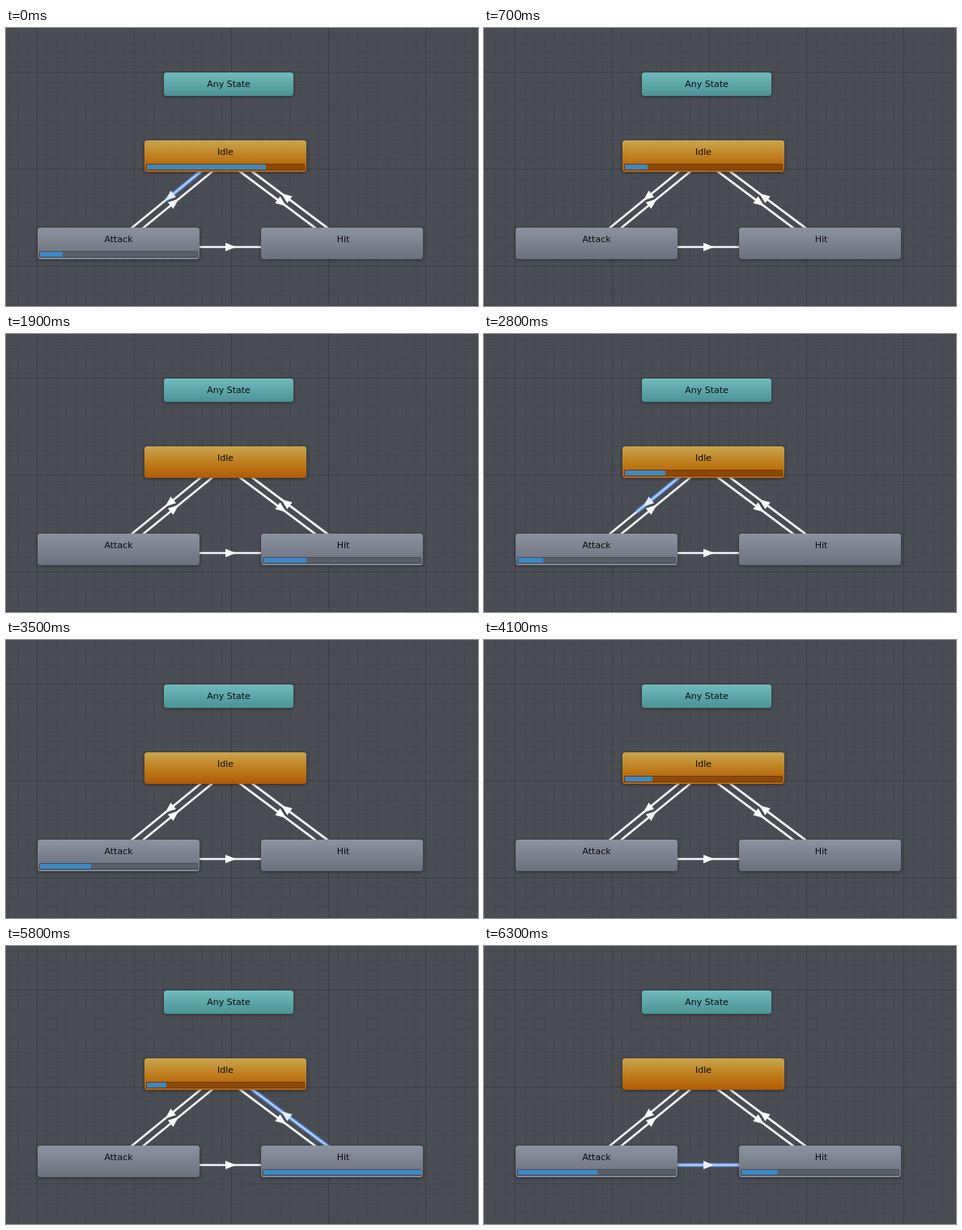
These frames come from a looping animation (583x344 px, 6.4 s). An HTML page with a canvas:

```html
<!DOCTYPE html>
<html lang="en">
<head>
<meta charset="utf-8">
<title>State machine</title>
<style>
html, body { margin: 0; width: 100%; height: 100%; overflow: hidden; background: #4a4d54; }
canvas { display: block; }
</style>
</head>
<body>
<canvas id="stage" width="583" height="344"></canvas>
<script>
const ctx = document.getElementById("stage").getContext("2d");
const LOOP = 6400, STEP = 100;

const GREY = { fill: ["#8d92a1", "#6b707c"], trough: "#595e69", edge: "#484c56", rim: "#969baa" };
const nodes = {
  any: { label: "Any State", x: 195, y: 55, w: 160, h: 29, fill: ["#70bbbc", "#4c9295"] },
  idle: { label: "Idle", x: 171, y: 139, w: 200, h: 39, fill: ["#c9a64f", "#bf7f1e", "#b05a04"],
          trough: "#8a4a06", edge: "#723b04", rim: "#c46f12" },
  attack: { label: "Attack", x: 39, y: 247, w: 200, h: 39, ...GREY },
  hit: { label: "Hit", x: 315, y: 247, w: 200, h: 39, ...GREY }
};

const links = [["idle", "attack"], ["attack", "idle"], ["idle", "hit"], ["hit", "idle"], ["attack", "hit"]];

// Playback of a state: name, start, end, clip length (ms)
const plays = [
  ["idle", -1361, 91, 1805], ["attack", -106, 600, 740],
  ["idle", 442, 895, 1800], ["hit", 708, 1645, 937],
  ["idle", 1420, 1830, 1800], ["hit", 1645, 2575, 930],
  ["idle", 2335, 2862, 1800], ["attack", 2705, 3305, 600],
  ["idle", 3155, 3460, 1800], ["attack", 3305, 3910, 600],
  ["idle", 3785, 5065, 1800], ["hit", 4882, 5812, 915],
  ["idle", 5575, 6090, 1800], ["attack", 5928, 6400, 740],
  ["hit", 6093, 6400, 915]
];

// Transition pulse: from, to, start, end
const pulses = [
  ["idle", "attack", -106, 91], ["attack", "idle", 442, 600],
  ["idle", "hit", 708, 895], ["hit", "idle", 1420, 1645],
  ["idle", "hit", 1645, 1830], ["hit", "idle", 2335, 2575],
  ["idle", "attack", 2705, 2862], ["attack", "idle", 3155, 3305],
  ["idle", "attack", 3305, 3460], ["attack", "idle", 3785, 3910],
  ["idle", "hit", 4882, 5065], ["hit", "idle", 5575, 5812],
  ["idle", "attack", 5928, 6090], ["attack", "hit", 6093, 6350]
];

function drawGrid() {
  ctx.fillStyle = "#4a4d54";
  ctx.fillRect(0, 0, 583, 344);
  const lines = (step, x0, y0, color) => {
    ctx.fillStyle = color;
    for (let x = x0; x < 583; x += step) ctx.fillRect(x, 0, 1, 344);
    for (let y = y0; y < 344; y += step) ctx.fillRect(0, y, 583, 1);
  };
  lines(12, 2, 6, "#45484f");
  lines(120, 38, 54, "#3b3e44");
}

function line(length, width, color) {
  ctx.strokeStyle = color;
  ctx.lineWidth = width;
  ctx.beginPath();
  ctx.moveTo(0, 0);
  ctx.lineTo(length, 0);
  ctx.stroke();
}

function drawLink([from, to], t) {
  const a = nodes[from], b = nodes[to];
  const dx = b.x - a.x, dy = b.y - a.y, length = Math.hypot(dx, dy);
  const pulse = pulses.find(p => p[0] === from && p[1] === to && t >= p[2] && t < p[3]);
  ctx.save();
  ctx.translate(a.x + a.w / 2, a.y + a.h / 2);
  ctx.rotate(Math.atan2(dy, dx));
  ctx.translate(0, 4.5);
  line(length, 2.6, "#f4f5f5");
  if (pulse) {
    const reach = length * (t - pulse[2]) / (pulse[3] - pulse[2]);
    line(reach, 6, "rgba(86,140,225,.45)");
    line(reach, 3.6, "#78a8ee");
    line(reach, 1.4, "#bcd6ff");
  }
  ctx.fillStyle = pulse ? "#e2edff" : "#fff";
  ctx.beginPath();
  ctx.moveTo(length / 2 + 7, 0);
  ctx.lineTo(length / 2 - 6, -5.2);
  ctx.lineTo(length / 2 - 6, 5.2);
  ctx.fill();
  ctx.restore();
}

function drawNode(name, t) {
  const { label, x, y, w, h, fill, trough, edge, rim } = nodes[name];
  const gradient = ctx.createLinearGradient(0, y, 0, y + h);
  fill.forEach((color, i) => gradient.addColorStop(i / (fill.length - 1), color));
  ctx.save();
  ctx.shadowColor = "rgba(0,0,0,.45)";
  ctx.shadowBlur = 4;
  ctx.shadowOffsetY = 1;
  ctx.fillStyle = gradient;
  ctx.beginPath();
  ctx.roundRect(x, y, w, h, 3.5);
  ctx.fill();
  ctx.restore();

  // The newest playback wins when a state restarts
  const play = plays.findLast(p => p[0] === name && t >= p[1] && t < p[2]);
  if (play) {
    ctx.strokeStyle = rim;
    ctx.lineWidth = 1;
    ctx.beginPath();
    ctx.moveTo(x + 2, y + h - .5);
    ctx.lineTo(x + w - 2, y + h - .5);
    ctx.stroke();
    ctx.fillStyle = edge;
    ctx.beginPath();
    ctx.roundRect(x + 2, y + 29, w - 4, 8, 1.5);
    ctx.fill();
    ctx.fillStyle = trough;
    ctx.fillRect(x + 3, y + 30, w - 6, 6);
    ctx.fillStyle = "#3d89c4";
    ctx.fillRect(x + 3, y + 30, Math.round(195 * Math.min(1, (t - play[1]) / play[3])), 6);
  }

  ctx.fillStyle = "#0b0b0b";
  ctx.font = "11px 'DejaVu Sans', sans-serif";
  ctx.textAlign = "center";
  ctx.fillText(label, x + w / 2 + (name === "hit" ? 1.5 : 0), y + 18);
}

function frame(now) {
  const t = Math.floor(now % LOOP / STEP) * STEP;
  drawGrid();
  links.forEach(link => drawLink(link, t));
  Object.keys(nodes).forEach(name => drawNode(name, t));
  requestAnimationFrame(frame);
}
requestAnimationFrame(frame);
</script>
</body>
</html>
```
